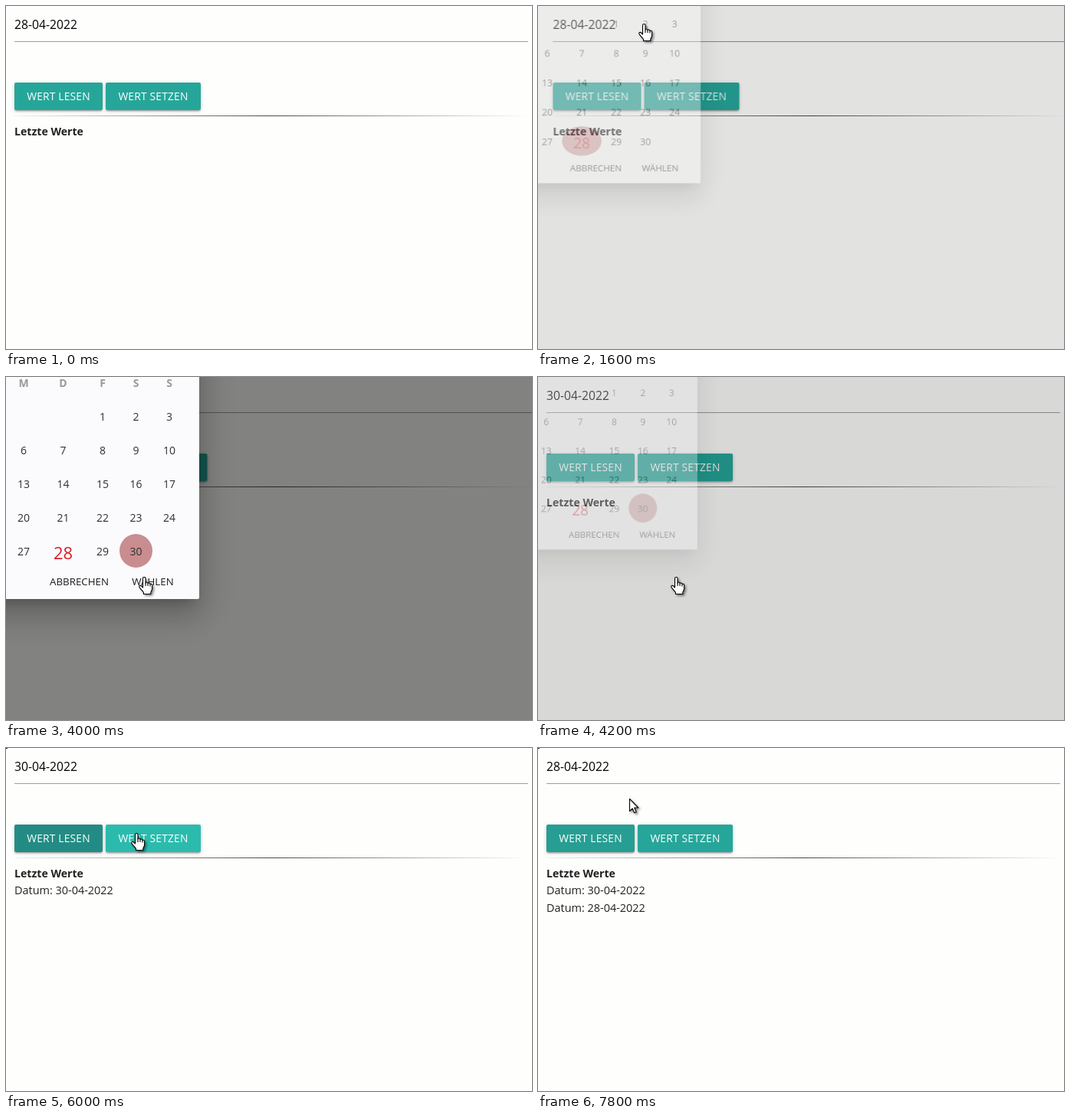
Animation of 686x448 px, one loop 8 s. Source, as an HTML page:

```html
<!DOCTYPE html>
<html lang="de">
<head>
<meta charset="utf-8">
<title>Datum</title>
<style>
html, body { margin: 0; width: 100%; height: 100%; overflow: hidden; background: #fefefd; }
body { position: relative; font: 14.45px/20px "Open Sans", "Noto Sans", sans-serif; color: #212121; }
div, span, svg { position: absolute; white-space: pre; }
.anim { animation: 8s step-end infinite; }

/* page */
#page { inset: 0; animation-name: shift; }
.date { left: 11px; top: 14px; font-size: 15.7px; color: #000; }
#date28 { animation-name: date28; }
#date30 { animation-name: date30; }
#underline { left: 11px; top: 46px; width: 670px; height: 1px; background: #9e9e9e; animation-name: underline; }
#rule { left: 11px; top: 143px; width: 670px; height: 1px;
  background: linear-gradient(90deg, rgba(0,0,0,.05), rgba(0,0,0,.72) 50%, rgba(0,0,0,0)); }
.btn { top: 100px; height: 36px; line-height: 36px; border-radius: 2px; text-align: center;
  font-size: 13.8px; letter-spacing: .2px; color: #fff; background: #26a69a;
  box-shadow: 0 2px 2px rgba(0,0,0,.14), 0 3px 1px -2px rgba(0,0,0,.12), 0 1px 5px rgba(0,0,0,.2); }
#read { left: 11px; width: 115px; animation-name: read; }
#set { left: 130px; width: 124px; animation-name: set; }
#title { left: 11px; top: 154px; font-size: 14.1px; font-weight: 700; }
.entry { left: 11px; }
#entry1 { top: 176px; animation-name: entry1; }
#entry2 { top: 199px; animation-name: entry2; }
#speck { left: 0; top: 0; width: 2px; height: 1px; background: #222; animation-name: speck; }

/* date picker */
#overlay { inset: 0; background: #000; opacity: 0; animation-name: overlay; }
#modal { left: 0; top: 0; transform-origin: 0 0; opacity: 0; animation-name: modal; }
#panel { left: -300px; top: -200px; width: 552px; height: 490px; border-radius: 2px; background: #fbfbfd;
  box-shadow: 0 24px 38px 3px rgba(0,0,0,.14), 0 9px 46px 8px rgba(0,0,0,.12), 0 11px 15px -7px rgba(0,0,0,.2); }
#modal span { transform: translate(-50%, -50%); font-size: 14px; color: #303030; }
#modal .head { font-weight: 700; color: #999; }
#modal .today { font-size: 22px; color: #d6202a; }
#modal .action { font-size: 13.3px; color: #1c1c1c; }
.mark { top: 205px; height: 44px; border-radius: 50%; background: #c98d90; }
#mark28 { left: 45px; width: 59px; animation-name: mark28; }
#mark30 { left: 148px; width: 43px; animation-name: mark30; }

/* pointer */
#pointer { left: 0; top: 0; overflow: visible; filter: drop-shadow(2px 2px 1.5px rgba(0,0,0,.45));
  animation: move 8s infinite, pointer 8s step-end infinite; }
#pointer path { fill: #fff; stroke: #000; stroke-width: 1.1; stroke-linejoin: round; }
#arrow { animation-name: arrow; }
#hand { animation-name: hand; }

@keyframes shift { 0%, 52.5%, 100% { transform: none } 20% { transform: translateX(8.5px) } }
@keyframes date28 { 0%, 80%, 100% { opacity: 1 } 52.5% { opacity: 0 } }
@keyframes date30 { 0%, 80%, 100% { opacity: 0 } 52.5% { opacity: 1 } }
@keyframes underline { 0%, 22.5%, 100% { background: #9e9e9e } 17.5% { background: #68a498 } }
@keyframes read {
  0%, 80%, 100% { background: #26a69a }
  62.5%, 85% { background: #2bbbad }
  72.5% { background: #228c84 }
  97.5% { background: #279e93 }
}
@keyframes set {
  0%, 10%, 92.5%, 100% { background: #26a69a }
  7.5%, 72.5% { background: #2bbbad }
  85% { background: #228c84 }
}
@keyframes entry1 { 0% { opacity: 0 } 67.5%, 100% { opacity: 1 } }
@keyframes entry2 { 0% { opacity: 0 } 92.5%, 100% { opacity: 1 } }
@keyframes speck { 0%, 20% { opacity: 0 } 2.5%, 62.5%, 100% { opacity: 1 } }
@keyframes overlay { 0%, 55%, 100% { opacity: 0 } 20% { opacity: .11 } 22.5% { opacity: .49 } 52.5% { opacity: .15 } }
@keyframes modal {
  0%, 55%, 100% { opacity: 0; transform: none }
  20% { opacity: .37; transform: translate(-8.1px, -22px) scale(.874) }
  22.5% { opacity: 1; transform: none }
  52.5% { opacity: .3; transform: translate(-9px, -24px) scale(.86) }
}
@keyframes mark28 { 0% { opacity: 1 } 42.5%, 100% { opacity: 0 } }
@keyframes mark30 { 0% { opacity: 0 } 42.5%, 100% { opacity: 1 } }
@keyframes pointer { 0% { opacity: 0 } 2.5%, 100% { opacity: 1 } }
@keyframes hand { 0%, 10%, 55%, 97.5%, 100% { opacity: 0 } 7.5%, 12.5%, 62.5% { opacity: 1 } }
@keyframes arrow { 0%, 10%, 55%, 97.5%, 100% { opacity: 1 } 7.5%, 12.5%, 62.5% { opacity: 0 } }
/* step counts keep every leg on a 200 ms beat */
@keyframes move {
  0%, 2.5% { transform: translate(172px, 292px); animation-timing-function: steps(2) }
  7.5% { transform: translate(160px, 115px); animation-timing-function: steps(2) }
  12.5% { transform: translate(139px, 26px); animation-timing-function: steps(3) }
  20% { transform: translate(138px, 23px); animation-timing-function: steps(5) }
  32.5% { transform: translate(125px, 218px); animation-timing-function: steps(2) }
  37.5% { transform: translate(162px, 192px); animation-timing-function: steps(2) }
  42.5% { transform: translate(170px, 222px); animation-timing-function: steps(1) }
  45% { transform: translate(180px, 261px); animation-timing-function: step-end }
  55% { transform: translate(178px, 262px); animation-timing-function: steps(3) }
  62.5% { transform: translate(75px, 118px); animation-timing-function: steps(2) }
  67.5% { transform: translate(72px, 112px); animation-timing-function: steps(3) }
  75% { transform: translate(170px, 111px); animation-timing-function: steps(2) }
  80% { transform: translate(167px, 116px); animation-timing-function: steps(3) }
  87.5% { transform: translate(80px, 120px); animation-timing-function: steps(2) }
  92.5% { transform: translate(76px, 122px); animation-timing-function: steps(1) }
  95% { transform: translate(98px, 106px); animation-timing-function: steps(1) }
  97.5%, 100% { transform: translate(119px, 66px) }
}
</style>
</head>
<body>
<div id="page" class="anim">
  <span id="date28" class="date anim">28-04-2022</span>
  <span id="date30" class="date anim">30-04-2022</span>
  <div id="underline" class="anim"></div>
  <div id="read" class="btn anim">WERT LESEN</div>
  <div id="set" class="btn anim">WERT SETZEN</div>
  <div id="rule"></div>
  <span id="title">Letzte Werte</span>
  <span id="entry1" class="entry anim">Datum: 30-04-2022</span>
  <span id="entry2" class="entry anim">Datum: 28-04-2022</span>
</div>
<div id="speck" class="anim"></div>
<div id="overlay" class="anim"></div>
<div id="modal" class="anim">
  <div id="panel"></div>
  <div id="mark28" class="mark anim"></div>
  <div id="mark30" class="mark anim"></div>
</div>
<svg id="pointer" width="1" height="1">
  <path id="arrow" class="anim" d="M.5.5V16.5L4.2 13 6.7 18.8 9.2 17.7 6.7 12H11.8Z"/>
  <g id="hand" class="anim">
    <path d="M-1.5 2.2C-1.5 0 2 0 2 2.2V8C2.5 6.6 5 6.8 5 8.6 5.6 7.4 8 7.8 8 9.6 8.8 8.8 10.6 9.3 10.6 11V15.5C10.6 18 8.8 19 8.8 20.5V22.5H-.5V20.5C-1.5 18.5-4.5 16-6 13.6-7 11.8-4.8 10.6-3.4 12L-1.5 14Z"/>
    <path d="M2 8V12M5 8.6V12M8 9.6V12.5"/>
  </g>
</svg>
<script>
const columns = [23, 74.5, 126, 169.5, 213];
const modal = document.getElementById('modal');

function label(text, x, y, kind = '') {
  const el = document.createElement('span');
  el.textContent = text;
  el.className = kind;
  el.style.left = x + 'px';
  el.style.top = y + 'px';
  modal.append(el);
}

columns.forEach((x, i) => label('MDFSS'[i], x, 7.5, 'head'));
for (let day = 1; day <= 30; day++) {
  const x = columns[(day + 1) % 7];
  const y = 51.5 + 44 * Math.floor((day + 1) / 7);
  if (x) label(day, x, day === 28 ? y + 1 : y, day === 28 ? 'today' : '');
}
label('ABBRECHEN', 95.5, 267, 'action');
label('WÄHLEN', 191.5, 267, 'action');
</script>
</body>
</html>
```
